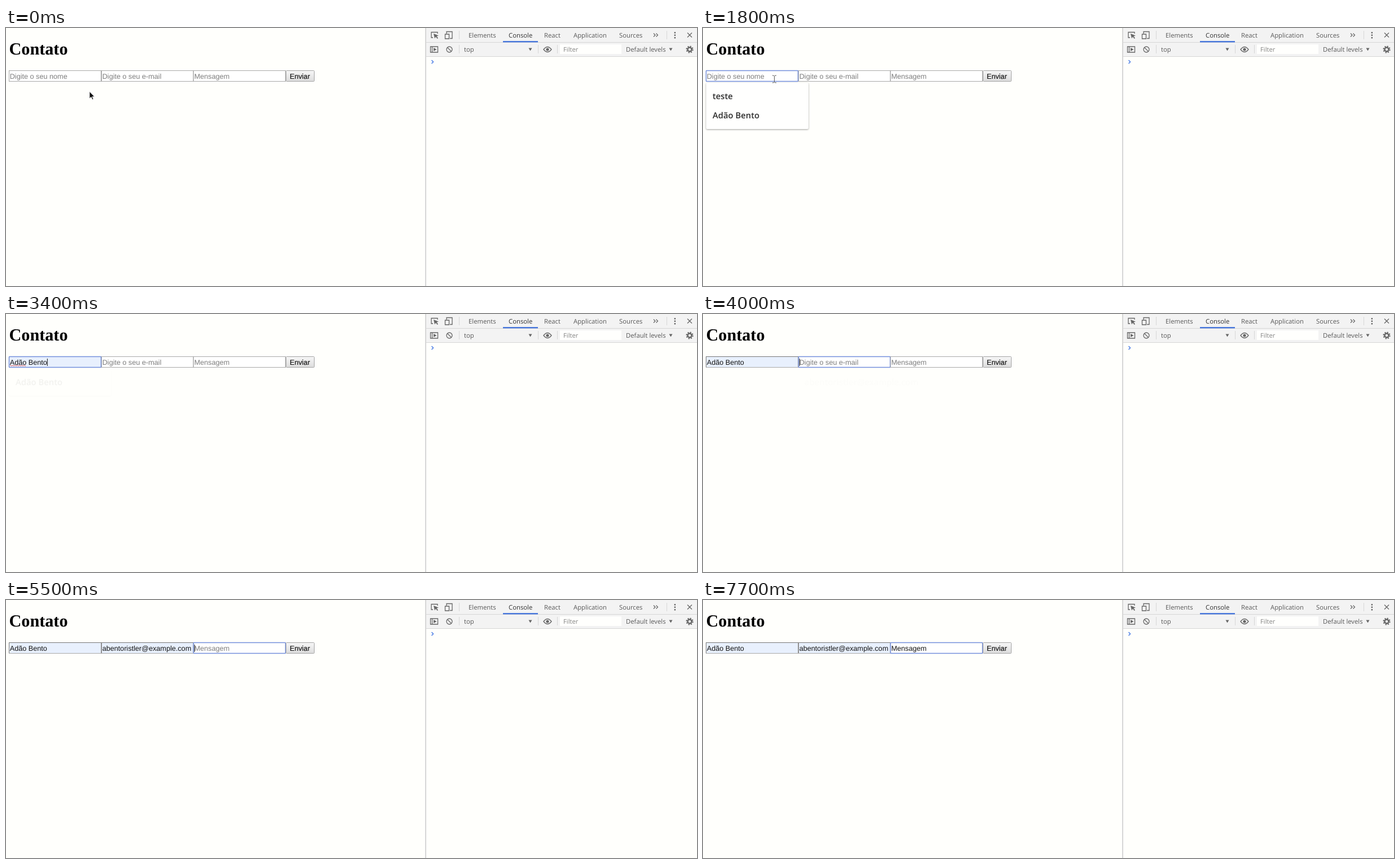
An HTML page for the animation above (8000 ms loop, 1225x457 px).

```html
<!DOCTYPE html>
<html lang="pt">
<head>
<meta charset="utf-8">
<title>Contato</title>
<style>
html, body { margin: 0; width: 100%; height: 100%; overflow: hidden; background: #fffffc; }
svg { display: block; }
text { white-space: pre; text-rendering: geometricPrecision; }
.title { font: bold 30.2px "Liberation Serif", serif; }
.field text, .btn text { font: 12.67px "Liberation Sans", Arial, sans-serif; fill: #141414; }
.btn text { stroke: #141414; stroke-width: .2; }
.field text.hint { fill: #7e7e7e; }
.box { fill: #fff; stroke: #a9a9a9; }
.edge { fill: none; stroke: #777; }
.ring { fill: none; stroke: #7590dc; stroke-width: 1.5; }
.caret { stroke: #111; }
.menu text { font: 600 14.8px "Open Sans", "Noto Sans", sans-serif; fill: #2e2e2e; }
.card { fill: #fffffe; filter: drop-shadow(0 1px 1.5px rgba(0,0,0,.38)); }
.pick { fill: #e8eaed; }
.tools text { font: 11.3px "Open Sans", "Noto Sans", sans-serif; fill: #5a5a5a; }
.icon { fill: none; stroke: #666; stroke-width: 1.3; }
.sep { stroke: #d6d6d6; }
.solid { fill: #666; }
</style>
</head>
<body>
<svg width="1225" height="457" viewBox="0 0 1225 457">
  <defs>
    <linearGradient id="face" x2="0" y2="1">
      <stop stop-color="#f7f7f7"/><stop offset="1" stop-color="#dcdcdc"/>
    </linearGradient>
  </defs>
  <rect width="1225" height="457" fill="#fffffc"/>
  <text class="title" x="5.5" y="47">Contato</text>

  <g id="form"></g>
  <g class="btn">
    <rect x="496.5" y="75.5" width="50" height="19" rx="1" fill="url(#face)" stroke="#a3a3a3"/>
    <text x="503" y="89.5">Enviar</text>
  </g>

  <g id="nameMenu" class="menu">
    <rect class="card" x="5.5" y="97" width="181.5" height="82" rx="2"/>
    <rect class="pick" x="6" y="104" width="180.5" height="33"/>
    <text class="first" x="17" y="126">teste</text>
    <text class="second" x="17" y="160">Adão Bento</text>
  </g>
  <g id="mailMenu" class="menu">
    <rect class="card" x="168.5" y="97" width="227.5" height="48" rx="2"/>
    <rect class="pick" x="169" y="104" width="226.5" height="33"/>
    <text x="180" y="126">abentoristler@example.com</text>
  </g>

  <g class="tools">
    <rect x="744" width="481" height="50" fill="#f3f3f3"/>
    <path class="sep" d="M744 25.5H1225M744 50.5H1225"/>
    <path d="M744 0V457" stroke="#d6d6d6" stroke-width="2"/>
    <rect x="881" y="23" width="62" height="2.4" fill="#4877dc"/>
    <text x="820" y="17">Elements</text>
    <text x="891" y="17" style="fill:#333">Console</text>
    <text x="954" y="17">React</text>
    <text x="1006" y="17">Application</text>
    <text x="1087" y="17">Sources</text>
    <path class="sep" d="M803.5 5V20M1171.5 5V20M803.5 30V45M943.5 30V45M977.5 30V45"/>
    <path class="icon" d="M757 17H754V7.500H765V10"/>
    <path class="solid" d="M758 10L767 13.500 763.500 14.500 766 18 764.500 19 762 15.500 760 18.500Z"/>
    <path class="icon" d="M781 10V6.500H791V18.500H787M778.500 11H785.500V19H778.500Z"/>
    <path class="icon" d="M1148 9.500L1151 12.500 1148 15.500M1152.500 9.500L1155.500 12.500 1152.500 15.500"/>
    <path class="solid" d="M1184.700 7h2.400v2.400h-2.400zM1184.700 11.500h2.400v2.400h-2.400zM1184.700 16h2.400v2.400h-2.400z"/>
    <path class="icon" d="M1208 8.500L1216 16.500M1216 8.500L1208 16.500"/>

    <path class="icon" d="M752.500 33H765.500V43H752.500ZM755.500 33V43"/>
    <path class="solid" d="M758 35L763.500 38 758 41Z"/>
    <circle class="icon" cx="786" cy="38" r="5"/>
    <path class="icon" d="M782.500 34.500L789.500 41.500"/>
    <text x="812" y="42">top</text>
    <path class="solid" d="M926.500 35.500H932.500L929.500 40.500ZM1175.500 35.500H1181.500L1178.500 40.500Z"/>
    <path class="icon" d="M953 38Q960 29 967 38Q960 47 953 38Z"/>
    <circle class="solid" cx="960" cy="38" r="2.600"/>
    <rect x="982" y="29" width="109" height="17" fill="#fffffd"/>
    <text x="988" y="42" style="fill:#858585">Filter</text>
    <text x="1099" y="42">Default levels</text>
    <circle cx="1212" cy="38" r="5.400" fill="none" stroke="#666" stroke-width="2.400" stroke-dasharray="2.120 2.120"/>
    <circle cx="1212" cy="38" r="3.500" fill="none" stroke="#666" stroke-width="2.400"/>
    <path d="M754.500 57L757.500 60 754.500 63" fill="none" stroke="#4d7fe6" stroke-width="1.500"/>
  </g>

  <path id="arrow" d="M0 0V12.500L3 9.800 5 14.500 7 13.600 5 9.200H9Z" fill="#111" stroke="#fff" stroke-width=".8"/>
  <path id="beam" d="M-3.500 -6Q0 -6 0 -4.500Q0 -6 3.500 -6M0 -4.500V5.500M-3.500 7Q0 7 0 5.500Q0 7 3.500 7" fill="none" stroke="#555"/>
</svg>
<script>
const LOOP = 8000, NAME = "Adão Bento", MAIL = "abentoristler@example.com", NOTE = "Mensagem";
const $ = id => document.getElementById(id);
const clamp = v => Math.max(0, Math.min(1, v));
const ramp = (t, a, b) => clamp((t - a) / (b - a));
const within = (t, a, b) => t >= a && t < b;
const show = (el, on) => el.style.opacity = +on;

// Latest value in [[time, value], ...] reached at t
const at = (t, keys) => keys.reduce((v, [k, next]) => t >= k ? next : v, "");

function makeField(x, w, hint) {
  const g = document.createElementNS("http://www.w3.org/2000/svg", "g");
  g.setAttribute("class", "field");
  g.innerHTML = `<rect class="box" x="${x + .5}" y="75.5" width="${w - 1}" height="19"/>
    <path class="edge" d="M${x + .5} 94V75.5H${x + w}"/>
    <text x="${x + 1.7}" y="89.5"></text>
    <path class="typo" fill="none" stroke="#e06060" d="M${x + 2} 91.500${"q1 -1.500 2 0t2 0".repeat(7)}"/>
    <rect class="ring" x="${x + .5}" y="75.5" width="${w - 1}" height="19" rx="1"/>
    <path class="caret" d="M0 79V92"/>`;
  $("form").append(g);
  const part = s => g.querySelector(s);
  const text = part("text");
  return ({ value, focus, tint, caret, typo }) => {
    text.textContent = value || hint;
    text.setAttribute("class", value ? "" : "hint");
    part(".box").style.fill = tint ? "#e8f0fd" : "#fff";
    show(part(".edge"), tint);
    show(part(".ring"), focus);
    show(part(".caret"), caret);
    show(part(".typo"), typo);
    const end = value ? text.getComputedTextLength() : 0;
    part(".caret").setAttribute("transform", `translate(${x + 2.2 + end} 0)`);
  };
}

const nameField = makeField(5, 164, "Digite o seu nome");
const mailField = makeField(169, 163.5, "Digite o seu e-mail");
const noteField = makeField(332, 164, "Mensagem");

const nameKeys = [[1900, "A"], [2200, "Ad"], [2400, "Ad~"], [2500, "Adã"], [3000, NAME]];
const noteKeys = [...NOTE.slice(0, 5)].map((c, i) => [6600 + i * 100, NOTE.slice(0, i + 1)])
  .concat([[7100, NOTE.slice(0, 7)], [7300, NOTE]]);

function drawNameMenu(t) {
  const menu = $("nameMenu"), short = t >= 2000;
  show(menu, ramp(t, 1000, 1300) * (1 - ramp(t, 3250, 3410)));
  menu.querySelector(".card").setAttribute("height", short ? 48 : 82);
  menu.querySelector(".second").setAttribute("y", short ? 126 : 160);
  show(menu.querySelector(".first"), !short);
  show(menu.querySelector(".pick"), within(t, 3000, 3250));
}

function drawPointer(t) {
  const p = ramp(t, 100, 700), e = p * p * (3 - 2 * p);
  const x = 148 - 21.5 * e, y = 112.5 - 22.5 * e, over = y < 95;
  for (const [id, on] of [["arrow", !over], ["beam", over]]) {
    $(id).setAttribute("transform", `translate(${x} ${y})`);
    show($(id), on && t < 3100);
  }
}

function draw(t) {
  nameField({
    value: at(t, nameKeys), focus: within(t, 1000, 3900), tint: t >= 3000,
    caret: within(t, 1300, 1800) || within(t, 3300, 3800), typo: within(t, 3300, 3900)
  });
  mailField({
    value: t >= 4300 ? MAIL : "", focus: within(t, 3900, 4900), tint: t >= 4300,
    caret: within(t, 3900, 4800), typo: false
  });
  noteField({
    value: at(t, noteKeys), focus: t >= 4900, tint: false,
    caret: within(t, 5500, 6100) || within(t, 6600, 7500), typo: false
  });
  drawNameMenu(t);
  show($("mailMenu"), ramp(t, 4000, 4200) * (1 - ramp(t, 4800, 4950)));
  show($("mailMenu").querySelector(".pick"), t >= 4300);
  drawPointer(t);
}

const start = performance.now();
function tick() {
  draw((performance.now() - start) % LOOP);
  requestAnimationFrame(tick);
}
tick();
</script>
</body>
</html>
```
